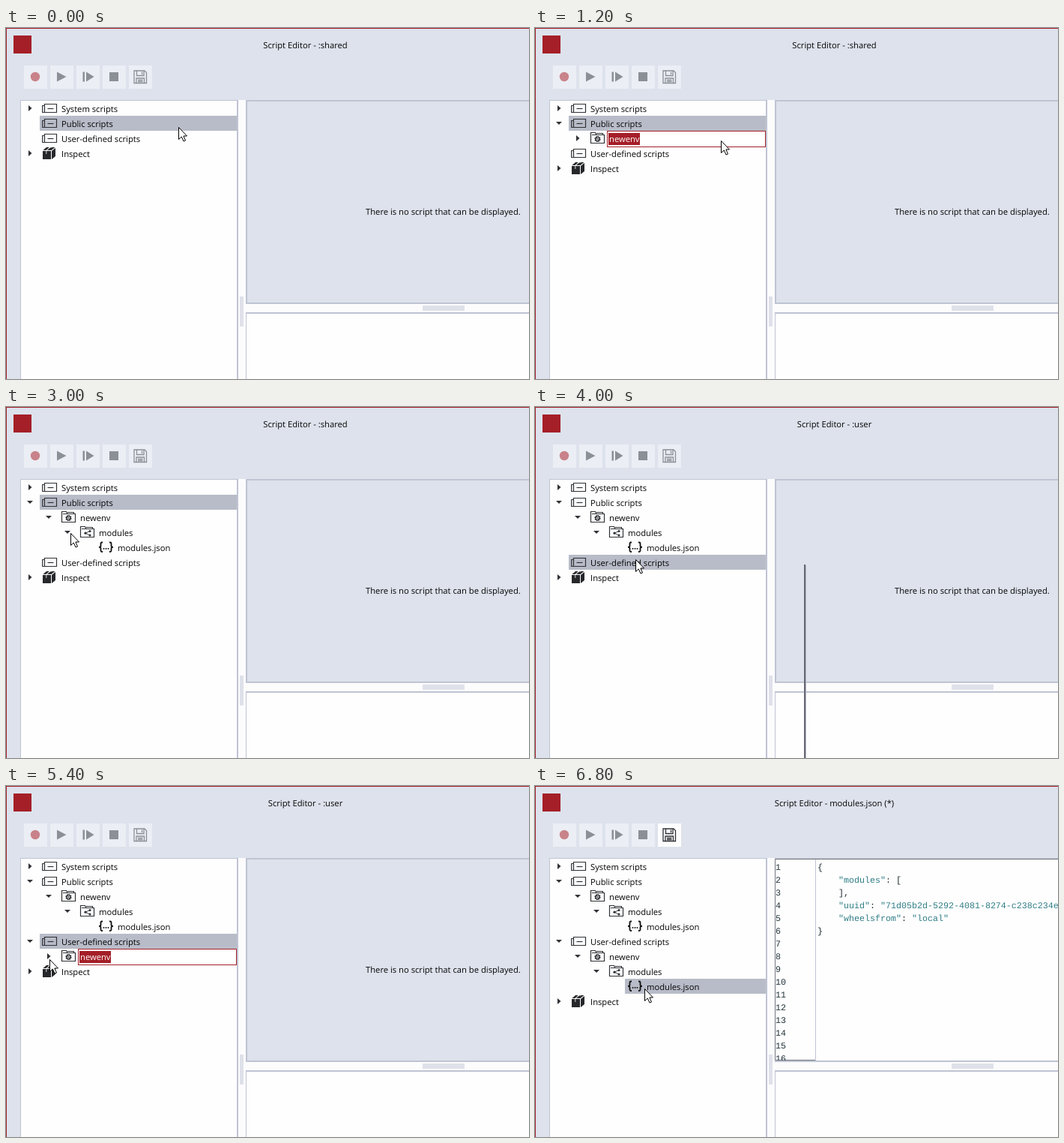
These frames come from a looping animation (698 by 468 pixels, 7200 ms). An HTML page:

```html
<!DOCTYPE html>
<html lang="en">
<head>
<meta charset="utf-8">
<title>Script Editor</title>
<style>
  html, body { margin: 0; width: 100%; height: 100%; overflow: hidden; background: #dde2ec; }
  svg { display: block; width: 698px; height: 468px; }
  text { font: 11.22px "Open Sans", "Noto Sans", sans-serif; fill: #050505; white-space: pre; text-rendering: geometricPrecision; }
  .code text { font: 11.667px "Liberation Mono", "DejaVu Sans Mono", monospace; }
  .line { fill: none; stroke: #303236; stroke-width: 1.2; }
</style>
</head>
<body>
<svg id="stage" viewBox="0 0 698 468" xmlns="http://www.w3.org/2000/svg"></svg>
<script>
const LOOP = 7200;
const RED = '#a51f28', EDGE = '#bfc4d3', SELECT = '#b8bcc8', DARK = '#303236', DIM = '#8d9096';

// Each step changes only the listed parts of the state.
// shared / user: 0 closed, 1 naming the environment, 2 environment open, 3 modules open
const steps = [
  { t: 0, x: 230, y: 132, shared: 0, user: 0, sel: 'Public scripts', menu: null, hot: false, shade: false, title: ':shared', file: false },
  { t: 200, menu: [230, 132] },
  { t: 400, x: 237, y: 139, hot: true },
  { t: 600, x: 245, y: 147 },
  { t: 800, x: 248, y: 150 },
  { t: 1200, menu: null, hot: false, shared: 1 },
  { t: 1400, x: 218, y: 150 },
  { t: 1600, x: 150, y: 147 },
  { t: 1800, x: 84, y: 143 },
  { t: 2000, x: 58, y: 142 },
  { t: 2200, shared: 2 },
  { t: 2400, x: 80, y: 163 },
  { t: 2800, shared: 3 },
  { t: 3000, x: 86, y: 168 },
  { t: 3200, x: 104, y: 182 },
  { t: 3400, x: 122, y: 196 },
  { t: 3600, x: 134, y: 203 },
  { t: 3800, sel: 'User-defined scripts', title: ':user' },
  { t: 4000, shade: true },
  { t: 4200, shade: false, menu: [134, 203] },
  { t: 4400, x: 144, y: 214, hot: true },
  { t: 4600, x: 152, y: 221 },
  { t: 4800, menu: null, hot: false, user: 1 },
  { t: 5000, x: 118, y: 226 },
  { t: 5200, x: 74, y: 230 },
  { t: 5400, x: 58, y: 231 },
  { t: 5600, user: 2 },
  { t: 5800, x: 80, y: 243 },
  { t: 6000, user: 3 },
  { t: 6200, x: 98, y: 252 },
  { t: 6400, x: 133, y: 266 },
  { t: 6600, x: 146, y: 270 },
  { t: 6800, sel: 'user/modules.json', title: 'modules.json (*)', file: true }
];
const states = [];
steps.reduce((s, step) => {
  const next = { ...s, ...step };
  states.push(next);
  return next;
}, {});

const rect = (x, y, w, h, fill, extra = '') =>
  `<rect x="${x}" y="${y}" width="${w}" height="${h}" fill="${fill}" ${extra}/>`;
const path = (d, fill, extra = '') => `<path d="${d}" fill="${fill}" ${extra}/>`;
const line = (d, extra = '') => `<path d="${d}" class="line" ${extra}/>`;
const text = (x, y, s, fill = '#050505', extra = '') =>
  `<text x="${x}" y="${y}" fill="${fill}" style="fill:${fill}" ${extra}>${s}</text>`;
const at = (x, y, body, extra = '') => `<g transform="translate(${x} ${y})" ${extra}>${body}</g>`;

// Icons are drawn from the top left of a 20 px cell.
const folder = line('M1.5 16.5V2.5H7.5L9 5.5H19.5V16.5ZM9 3.5H17.5V5M3 5.5H9');
const icons = {
  box: line('M3.5 4.5H19.5V15.5H3.5ZM3.5 6.5H.7V15.5H3.5') + line('M7.5 10.5H15.5', 'stroke-width="1.6"'),
  env: folder +
    `<circle cx="10.5" cy="11" r="3" class="line" stroke-dasharray="1.5 .8" style="stroke-width:2.2"/>` +
    `<circle cx="10.5" cy="11" r="2.6" class="line"/><circle cx="10.5" cy="11" r="1" fill="${DARK}"/>`,
  modules: folder + line('M14 8.5L8 11.2L14 14', 'style="stroke-width:.9"') +
    [[14, 8.5], [8, 11.2], [14, 14]].map(([x, y]) => `<circle cx="${x}" cy="${y}" r="1.6" fill="${DARK}"/>`).join(''),
  json: line('M6 3.5H5Q3.5 3.5 3.5 5V8Q3.5 9.8 1 9.8Q3.5 9.8 3.5 11.6V14.5Q3.5 16 5 16H6' +
    'M15 3.5H16Q17.5 3.5 17.5 5V8Q17.5 9.8 20 9.8Q17.5 9.8 17.5 11.6V14.5Q17.5 16 16 16H15', 'style="stroke:#111;stroke-width:1.8"') +
    [7, 10, 13].map(x => rect(x - .3, 11, 1.6, 1.8, '#111')).join(''),
  cube: path('M1 7H12V18H1ZM13 7L18 3V14L13 18ZM1.5 6L6 2H10L5.5 6ZM7 6L11.5 2H17.5L12.5 6Z', '#27282b') +
    line('M5.8 7V11M9 2.2L13.5 2', 'style="stroke:#fff;stroke-width:.8"')
};

function twisty(x, y, open) {
  return path(open ? `M${x - 4} ${y - 2}h8l-4 4Z` : `M${x - 2} ${y - 4}l4.5 4l-4.5 4Z`, DARK);
}

function branch(label, key, level) {
  const rows = [{ label, id: label, icon: 'box', depth: 0, open: level ? true : null }];
  if (level > 0) rows.push({ label: 'newenv', icon: 'env', depth: 1, open: level > 1, edit: level === 1 });
  if (level > 1) rows.push({ label: 'modules', icon: 'modules', depth: 2, open: level > 2 });
  if (level > 2) rows.push({ label: 'modules.json', id: key + '/modules.json', icon: 'json', depth: 3, open: null });
  return rows;
}

function tree(s) {
  const rows = [
    { label: 'System scripts', icon: 'box', depth: 0, open: false },
    ...branch('Public scripts', 'shared', s.shared),
    ...branch('User-defined scripts', 'user', s.user),
    { label: 'Inspect', icon: 'cube', depth: 0, open: false }
  ];
  return rows.map((r, i) => {
    const y = 97 + i * 20, dx = r.depth * 25;
    let out = r.id && r.id === s.sel ? rect(45 + dx, y, 263 - dx, 20, SELECT) : '';
    if (r.open !== null) out += twisty(32 + dx, y + 10, r.open);
    out += at(48 + dx, y, icons[r.icon]);
    if (r.edit) {
      out += rect(96.5, y + .5, 211, 21, '#fff', `stroke="${RED}"`) + rect(98, y + 3, 42, 16, RED);
      return out + text(99, y + 15, r.label, '#fff');
    }
    return out + text(74 + dx, y + 15, r.label);
  }).join('');
}

function toolbar(active) {
  const gray = '#8b9097', ink = active ? '#303236' : gray;
  return [24, 59, 94, 129, 164].map((x, i) => rect(x, 50, 31, 31, active && i === 4 ? '#fdfdfe' : '#ebeef4')).join('') +
    `<circle cx="39" cy="65" r="6.2" fill="#c9828a"/>` +
    path('M68 58.5L80.5 65L68 71.5Z', gray) +
    path('M102.5 58.5h2.5v13h-2.5ZM107 58.5L117.5 65L107 71.5Z', gray) +
    rect(138, 59, 12, 12, gray) +
    line('M171 57H185L187.500 59.500V73.500H171ZM174.500 57V63.500H184V57M174 73V67H184.500V73M176 69.500H182.500M176 71.500H182.500M181.500 58.500V62',
      `style="stroke:${ink};stroke-width:1.3"`);
}

function editor() {
  const ink = '#1d2a2d', teal = '#2f7d86';
  const lines = [[0, '{', ink], [4, '"modules": [', teal], [4, '],', ink],
    [4, '"uuid": "71d05b2d-5292-4081-8274-c238c234e', teal], [4, '"wheelsfrom": "local"', teal], [0, '}', ink]];
  let out = rect(320, 97, 378, 269, '#fefefe') + line('M698 97.5H320.5V365.5H374', 'style="stroke:#74777f;stroke-width:1"') +
    rect(374, 98, 1, 268, EDGE);
  for (let i = 0; i < 16; i++) out += text(321, 112 + i * 17, i + 1, '#22333a');
  lines.forEach(([indent, s, fill], i) => {
    const mark = fill === teal ? s.replace(/(": ?|\[|,)/g, m => m === '[' ? `<tspan style="fill:${ink}">[</tspan>` :
      m.startsWith('":') ? `"<tspan style="fill:${ink}">${m.slice(1)}</tspan>` : m) : s;
    out += text(377 + indent * 7, 112 + i * 17, mark, fill);
  });
  return `<g class="code" clip-path="url(#view)">${out}</g>`;
}

function menu([x, y], hot) {
  const items = [
    [22, 'new environment', 'Ctrl+E', true], [54, 'install python package', '', true],
    [95, 'New Script', 'Ctrl+N', true], [124, 'New Folder', '', true],
    [160, 'Cut', 'Ctrl+X'], [187, 'Copy', 'Ctrl+C'], [214, 'Paste', 'Ctrl+V'],
    [253, 'Delete...', 'Del'], [285, 'Rename', 'F2'], [323, 'Edit Properties...', '']
  ];
  const dim = 'style="stroke:#8d9096;stroke-width:1.2"';
  let out = rect(3, 3, 224, 380, '#5c5e68', 'opacity=".3"') + rect(2, 2, 224, 380, '#5c5e68', 'opacity=".75"') +
    rect(.5, .5, 224, 380, '#fdfdfe', 'stroke="#b4b8c4"');
  if (hot) out += rect(5, 6, 215, 31, SELECT);
  out += [73, 141, 231, 304].map(v => rect(5, v, 215, 1, '#c3c7d3')).join('');
  out += items.map(([v, label, keys, on]) => {
    const fill = on ? '#050505' : DIM;
    return text(35, v + 4, label, fill) + text(153, v + 4, keys, fill);
  }).join('');
  out += at(8, 10, icons.env) + `<circle cx="19" cy="54" r="9" fill="#111"/>`;
  out += line('M12.500 85.500H25.500V103.500H12.500ZM15 89.500H23M15 92.500H23M15 95.500H23M15 99.500H23');
  out += line('M12 248H26M16.500 248V245.500H21.500V248M13.500 250.500H24.500V260.500H13.500ZM17 252V259M19 252V259M21 252V259', dim);
  out += line('M15 279.500H10.500V291.500H15M18 279.500H27.500V291.500H18M16.500 276V295M14 275.500H19M14 295.500H19', dim);
  return at(x, y, out);
}

const pointer = path('M.5 .5V16.500L4.300 13L7 19L9.500 18L6.900 12H11.500Z', '#fff', 'stroke="#000"');

function draw(s) {
  return `<defs><clipPath id="view"><rect x="320" y="97" width="378" height="269"/></clipPath></defs>` +
    rect(0, 0, 698, 468, '#dde2ec') + rect(0, 0, 698, 1, RED) + rect(0, 0, 1, 468, RED) +
    rect(10, 10, 24, 24, RED) +
    text(399.5, 27, 'Script Editor - ' + s.title, '#050505', 'text-anchor="middle"') +
    toolbar(s.file) +
    rect(19, 96, 291, 372, EDGE) + rect(20, 97, 288, 371, '#fefefe') +
    rect(310, 96, 10, 372, '#fcfcfd') + rect(312, 358, 5, 40, '#dfe1ea') +
    rect(320, 96, 378, 272, EDGE) + rect(322, 98, 376, 268, '#dde2ec') +
    rect(320, 368, 378, 11, '#fcfcfd') + rect(556, 370, 56, 7, '#dfe1ea') +
    rect(320, 379, 378, 89, EDGE) + rect(321, 381, 377, 87, '#fefefe') +
    (s.file ? editor() : text(480, 249, 'There is no script that can be displayed.')) +
    tree(s) +
    (s.shade ? rect(359, 210, 2, 258, '#656872') + rect(361, 211, 1, 257, '#b5b8c2') : '') +
    (s.menu ? menu(s.menu, s.hot) : '') +
    at(s.x, s.y, pointer);
}

const stage = document.getElementById('stage');
const start = performance.now();
let shown = null;

function tick() {
  const t = Math.max(0, performance.now() - start) % LOOP;
  const state = states.findLast(s => s.t <= t);
  if (state !== shown) {
    stage.innerHTML = draw(state);
    shown = state;
  }
  requestAnimationFrame(tick);
}
tick();
</script>
</body>
</html>
```
